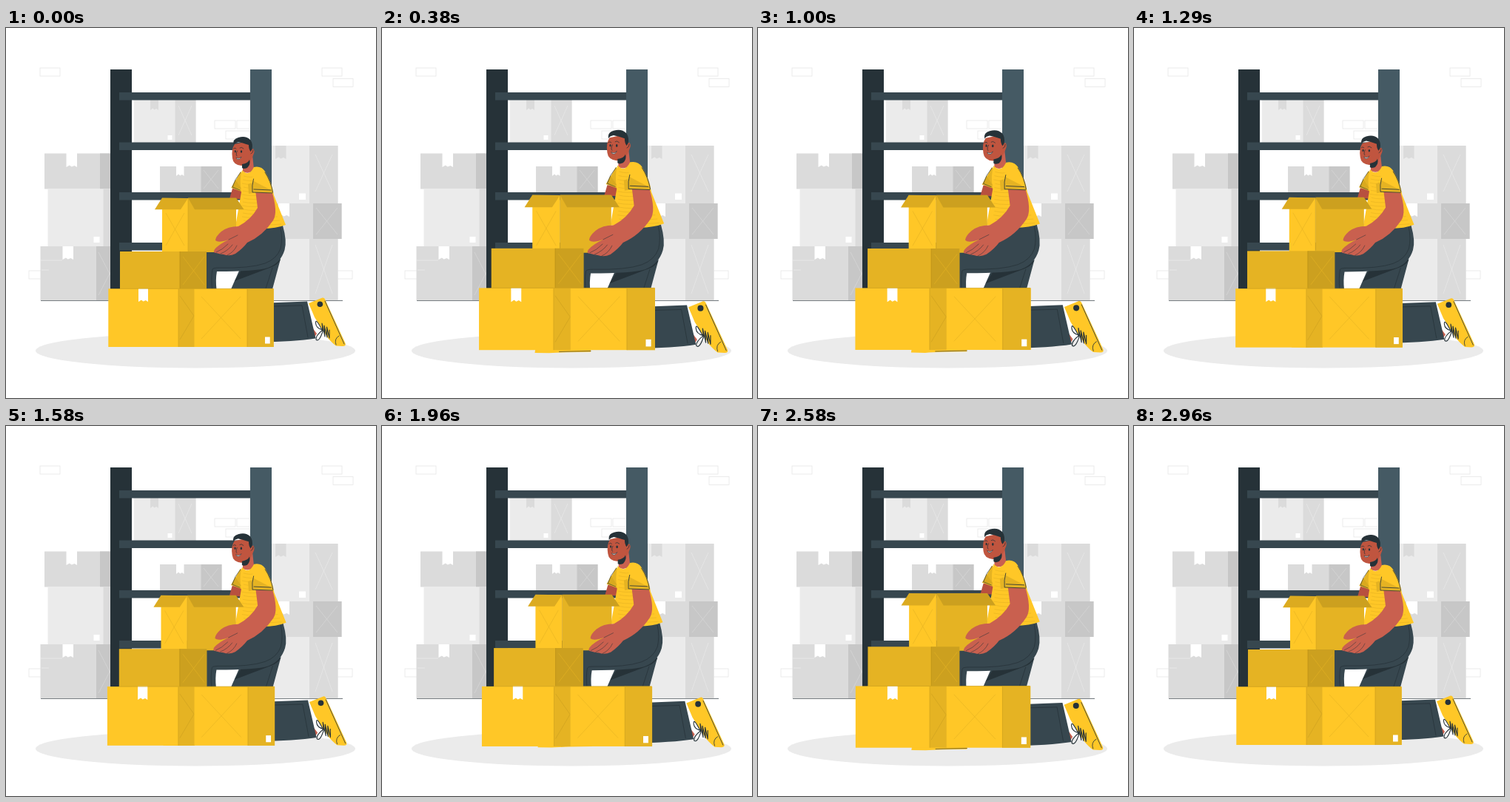
Animation of 500x500 px, one loop 3000 ms. Source, as an HTML page:

```html
<!DOCTYPE html>
<html lang="en">
<head>
<meta charset="utf-8">
<title>Packing boxes</title>
<style>
html, body { margin: 0; width: 100%; height: 100%; overflow: hidden; background: #fff; }
svg { display: block; width: 100vw; height: 100vh; }
.line { fill: none; stroke: #263238; stroke-linecap: round; stroke-linejoin: round; }
</style>
</head>
<body>
<svg viewBox="0 0 500 500">
  <ellipse cx="256" cy="436" rx="216" ry="23.5" fill="#ebebeb"/>
  <path d="M47 368.4H455" stroke="#263238" stroke-width=".7"/>
  <g id="back"></g>

  <g id="man">
    <!-- front shoe sole -->
    <path d="M215 424H285V428.8Q250 429 232 430.3L214 430Z" fill="#ffc727"/>
    <path class="line" d="M245 428.5L285 427.6" stroke-width=".6"/>

    <!-- kneeling leg and shoe -->
    <path d="M408 375L420 412L414 414Z" fill="#fff"/>
    <path d="M414 405L420 413L416 419Z" fill="#c9604f"/>
    <path d="M340 372L407 369.5L418.500 419.500Q390 424 340 424.500Z" fill="#37474f"/>
    <path class="line" d="M362 376L400 375L408 418" stroke-width=".7"/>
    <path d="M409 372L427.500 364.500Q430 364 431 366.500L458.500 426Q460 430 455 430L446 429.500Q441 426 435 419L417 391Z" fill="#ffc727"/>
    <path class="line" d="M431 369L457 427M446 428Q443 420 450 416" stroke-width=".8"/>
    <circle cx="424.300" cy="373.300" r="3.800" fill="#263238"/>
    <path class="line" d="M428 410Q418 390 418.500 399Q419 406 428 408Q418 416 419 421Q423 425 428 410L427 399L431 417L430 402L434 418L433.500 404L437 419L437 408" stroke-width="1.100"/>

    <!-- far leg, then raised thigh -->
    <path d="M304 353L315 328L371 312L360 353Z" fill="#37474f"/>
    <path d="M309 342L318 327L371 313Q367 320 359 323Z" fill="#263238"/>
    <path class="line" d="M351 352L360 324" stroke-width=".7"/>
    <path d="M265 300H306L340 267L374 267Q380 288 376.500 300Q371 318 354 324Q338 329 285 329Q283 340 284.500 353H265Z" fill="#37474f"/>
    <path class="line" d="M278.500 352Q277 337 279 326Q280 324 288 324Q330 325 350 318Q366 312 371 298Q374 285 371 270" stroke-width=".7"/>

    <!-- far arm, neck, shirt -->
    <path d="M306 217L302 231H318L319 218Z" fill="#b8503f"/>
    <path d="M320 176L333 172L335 190Q329 199 320 194Z" fill="#c9604f"/>
    <path d="M317 194L304.500 216L318 221L325 205Z" fill="#e5b323"/>
    <path d="M319 192Q328 202 335 188Q345 186 350 194Q360 210 362 226L378 266Q363 272 340 271L310 268L318 222Q315 205 319 192Z" fill="#ffc727"/>
    <path d="M327 211L333 209L334 223L328 224Z" fill="#e5b323"/>
    <path d="M318 217L304.500 216L310 205Z" fill="#d9a91f"/>
    <path class="line" d="M317 195Q309 204 306 215L316 219" stroke-width=".6"/>
    <g id="stripes" stroke="#e5b323" stroke-width=".6" fill="none"></g>

    <!-- head -->
    <path d="M309 157Q304 164 306 176Q307 185 318 186Q327 186 331 179L334 172Q337 166 334 163L331 164L328 153Z" fill="#c0553f"/>
    <path d="M319 184Q327 183 329 178Q331 184 326 189Q321 191 319 189Z" fill="#263238"/>
    <path d="M307.500 158Q306 150 314 148Q324 145 330 151Q334 156 332.500 164L330.500 167Q328 164 328 158Q319 155 314 154Q309 155 307.500 158Z" fill="#263238"/>
    <path class="line" d="M331 170Q334 169 334 165M307.500 163Q309 161 311 163M316 162Q318 160 321 163M312.500 166Q310 171 312 173" stroke-width=".7"/>
    <ellipse cx="309.800" cy="166.800" rx="1" ry="1.700" fill="#263238"/>
    <ellipse cx="318" cy="167" rx="1.200" ry="1.800" fill="#263238"/>
    <path d="M311 175Q315 178 318 174Q316 179 312 177Z" fill="#fff" stroke="#263238" stroke-width=".6"/>

    <!-- open carton -->
    <path d="M211 230H246V303H211Z" fill="#ffc727"/>
    <path d="M246 230H311V303H246Z" fill="#e5b323"/>
    <path d="M216 250L241 294M241 250L216 294" stroke="#e5b323" stroke-width=".6"/>
    <path d="M211 229.500L246 230L236 245.200H201Z" fill="#dcab20"/>
    <path d="M246 229.500H311L321.500 245.200H255Z" fill="#cca01f"/>
    <path d="M246 231V302" stroke="#cca01f" stroke-width=".5"/>

    <!-- near arm and sleeve -->
    <path d="M337 219L340 243Q331 259 314 268Q300 268 291 275Q283 282 283 287Q287 291 301 286Q288 292 282 299Q279 304 284 304Q290 306 294 306Q302 309 310 305Q320 298 326 290Q347 281 361 260Q368 249 359 220Z" fill="#c9604f"/>
    <path class="line" d="M284 303Q292 300 300 292M290 305Q300 301 306 293M299 307Q308 303 312 294M301 286L313 280" stroke-width=".5"/>
    <path d="M333 203L335 190Q346 186 351 196Q358 208 360.500 223L333 222Z" fill="#ffc727"/>
    <path d="M333 206L360 220L360.500 223.500L333 222Z" fill="#e5b323"/>
    <path class="line" d="M334.500 204Q332 213 333 222L360 223M350 195Q358 207 360.500 222M335 218L358 219" stroke-width=".8"/>
  </g>

  <g id="stack"></g>
</svg>
<script>
const $ = id => document.getElementById(id);
const rect = (x, y, w, h, fill) => `<rect x="${x}" y="${y}" width="${w}" height="${h}" fill="${fill}"/>`;
const tape = (x, y, w, h, fill) =>
  `<path d="M${x} ${y}h${w}v${h}l${-w * .25} -2l${-w * .25} 1.500l${-w * .2} -2l${-w * .3} 2.500z" fill="${fill}"/>`;
const cross = (x, y, w, h, color) =>
  `<path d="M${x} ${y}l${w} ${h}m0 ${-h}l${-w} ${h}" stroke="${color}" stroke-width=".6"/>`;

// A carton with a front face from x to edge and a side face from edge to right.
const carton = (x, y, edge, right, bottom, front, side) =>
  rect(x, y, right - x, bottom - y, front) + rect(edge, y, right - edge, bottom - y, side);

const pale = '#ebebeb', grey = '#dbdbdb', deep = '#c7c7c7';
const bricks = [[46, 54, 27], [427, 54, 27], [442, 68.5, 27], [282, 125, 28],
  [312, 125, 27], [297, 139, 33], [31, 328, 27], [441, 328, 27]];
const brick = ([x, y, w]) =>
  `<rect x="${x}" y="${y}" width="${w}" height="11" fill="none" stroke="#e6e6e6" stroke-width=".8"/>`;

$('back').innerHTML =
  bricks.map(brick).join('') +
  carton(52, 169.5, 127, 142, 217.5, grey, deep) + tape(81.5, 169, 14.500, 19, '#fff') +
  carton(56.5, 217.5, 131.5, 142, 295, pale, grey) + rect(118.5, 282, 8, 8, '#fff') +
  carton(46.5, 295, 122, 142, 368, grey, deep) + tape(76.5, 295, 14.500, 18, '#fff') +
  cross(125, 303, 30, 58, grey) +
  `<path d="M46 314H76M48 327H58" stroke="${pale}" stroke-width=".7"/>` +
  carton(357, 159, 410, 448.5, 237, pale, grey) + tape(364, 159, 14.500, 18, grey) +
  rect(396, 223.5, 9, 8.500, '#fff') + cross(418, 171, 23, 50, pale) +
  carton(357, 237, 415, 453.5, 285, grey, deep) + tape(368, 237, 15, 18, '#fff') +
  cross(419, 243, 29, 36, grey) +
  carton(357, 285, 410, 448.5, 368, pale, grey) + cross(418, 293, 23, 66, pale) +
  carton(173, 97, 228.5, 256.5, 155, pale, grey) + tape(195, 97, 11, 14, grey) +
  rect(218.5, 145, 6, 6, '#fff') + cross(233, 105, 18, 40, pale) +
  carton(208, 187, 263.5, 291.5, 223, grey, deep) + tape(230, 187, 10.500, 13, '#fff') +
  cross(267, 192, 20, 25, grey) +
  rect(141, 56, 29, 297, '#263238') +
  rect(330, 56, 29, 297, '#455a64') +
  [87, 154.5, 222, 290].map(y => rect(153, y, 177, 10.5, '#37474f')).join('');

const gold = '#ffc727', amber = '#e5b323', ochre = '#cca01f';
$('stack').innerHTML =
  carton(154, 302, 235, 271, 353, amber, ochre) + cross(239, 309, 29, 38, amber) +
  `<path d="M235 302V352" stroke="#b58c17" stroke-width=".6"/>` +
  carton(138.3, 352.3, 233, 255, 431, gold, amber) + tape(179, 352, 13, 18, '#fff') +
  `<path d="M233 353V431M235 362L254 389L235 421" stroke="${ochre}" fill="none" stroke-width=".6"/>` +
  carton(254.5, 352.3, 326, 361.7, 431, gold, amber) + cross(264, 363, 53, 57, amber) +
  `<path d="M326 352V431M154 352.300H361" stroke="${ochre}" stroke-width=".7"/>` +
  rect(350, 417.5, 6.700, 9, '#fff');

let stripes = '';
for (let y = 200; y < 268; y += 5) stripes += `M${319 + (y % 3)} ${y}Q332 ${y + 3} ${Math.min(372, 334 + (y - 195) * .55)} ${y}`;
$('stripes').innerHTML = `<path d="${stripes}"/>`;

// Swell over the loop: [ms, added scale]
const swell = [[0, 0], [130, .015], [270, .052], [380, .065], [700, .068], [1000, .062],
  [1090, .028], [1200, .012], [1400, .008], [1580, .0125], [1960, .030], [2170, .037],
  [2580, .058], [2650, .050], [2740, .012], [2850, .003], [2960, 0], [3000, 0]];

function scaleAt(t) {
  const i = swell.findIndex(k => k[0] > t);
  const [t0, a] = swell[i - 1], [t1, b] = swell[i];
  return 1 + a + (b - a) * (t - t0) / (t1 - t0);
}

const zoom = (id, x, y, s) =>
  $(id).setAttribute('transform', `translate(${x} ${y}) scale(${s}) translate(${-x} ${-y})`);

const start = performance.now();
function draw() {
  const s = scaleAt((performance.now() - start) % 3000);
  zoom('man', 330, 291, s);
  zoom('stack', 250, 366.5, s);
  requestAnimationFrame(draw);
}
draw();
</script>
</body>
</html>
```
